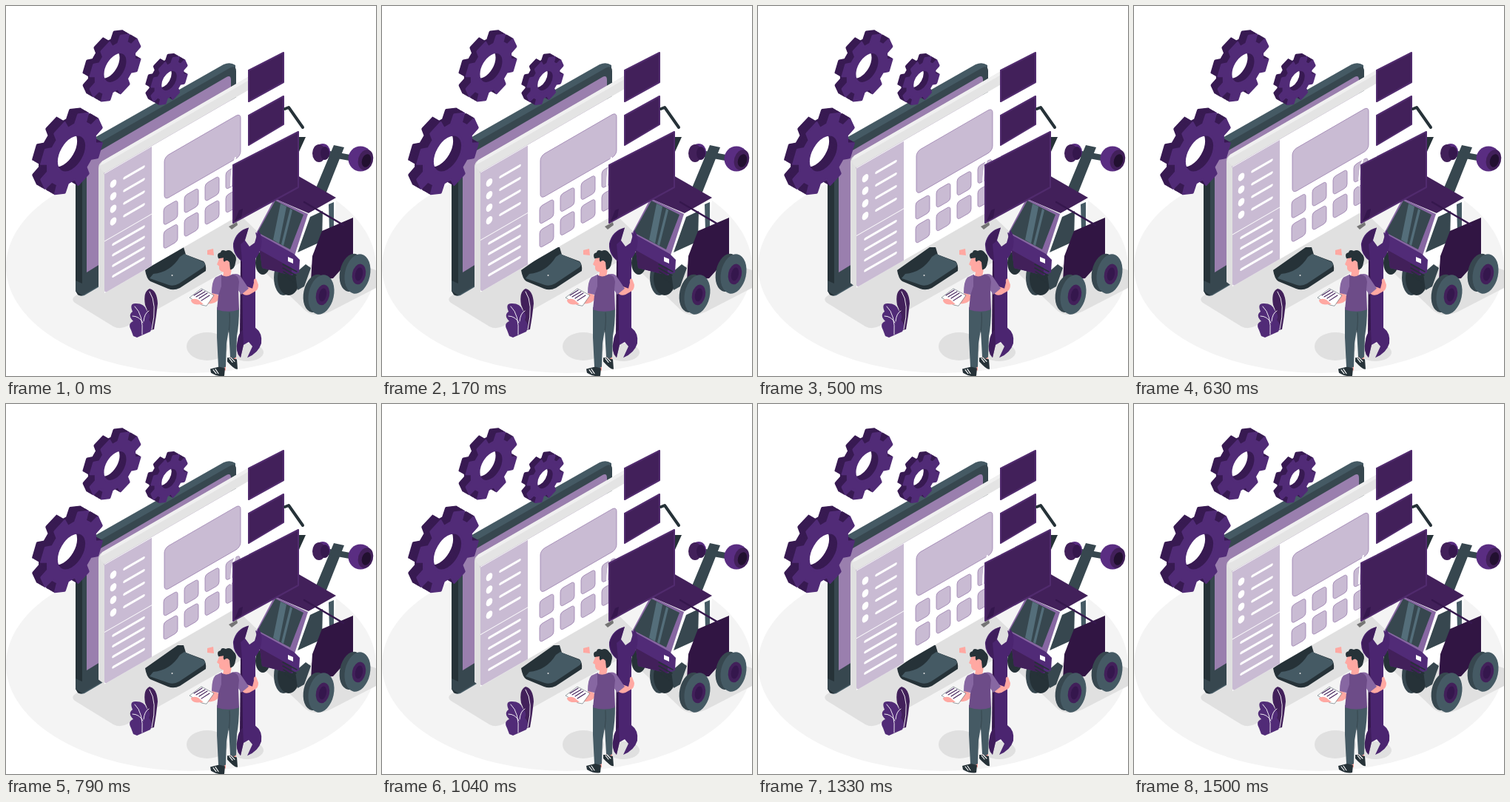
Animation of 500 by 500 pixels, one loop 1540 ms. Source, as an HTML page:

```html
<!DOCTYPE html>
<html lang="en">
<head>
<meta charset="utf-8">
<title>Workshop</title>
<style>
html, body { margin: 0; height: 100%; overflow: hidden; background: #fff; }
svg { display: block; width: 100vw; height: 100vh; }
.line { fill: none; stroke-linecap: round; stroke-linejoin: round; }
</style>
</head>
<body>
<svg viewBox="0 0 500 500">
  <!-- floor and shadows -->
  <ellipse cx="250" cy="352" rx="250" ry="144" fill="#f4f4f4"/>
  <g fill="#e0e0e0">
    <path d="M92 393Q88 397 93 401L145 433Q154 438 165 432L338 335 345 310 318 284 270 270Z"/>
    <path d="M345 355L405 412Q418 422 438 413L500 381V357L465 345Z"/>
    <ellipse cx="272" cy="460" rx="28" ry="19"/>
    <ellipse cx="326" cy="468" rx="22" ry="12"/>
  </g>

  <!-- monitor -->
  <path fill="#455a64" d="M94 202Q94 193 102 188L294 79Q303 75 310 80L311 270 106 391Q101 393 97 390L94 385Z"/>
  <path fill="#263238" d="M94 202Q94 196 98 192L106 197Q103 201 103 206V391Q99 392 97 390L94 385Z"/>
  <path fill="#37474f" d="M103 206Q103 198 110 194L302 84Q311 79 311 88V270L103 391Z"/>
  <path fill="#37474f" d="M94 371L103 375V391L94 385Z"/>
  <path fill="#9a7fae" d="M109 214Q109 206 116 202L298 96Q304 93 304 100V240L109 360Z"/>
  <path fill="#263238" d="M188 357L232 326H240L243 336 267 345Q271 349 270 358L235 381Q227 385 219 382L195 372Q190 369 188 357Z"/>
  <path fill="#455a64" d="M199 362Q222 360 235 339L241 335 267 346Q271 349 267 353L234 375Q227 379 220 377L194 368Z"/>
  <circle cx="224.500" cy="364" r="1" fill="#e0e0e0"/>

  <g id="gears" stroke-width="3" stroke-linejoin="round" fill-rule="evenodd"></g>

  <!-- floating page -->
  <g id="page">
    <path fill="#e0e0e0" d="M125 219Q125 213 130 210L133 228V388L125 382Z"/>
    <g transform="matrix(1 -.577 0 1 133 228)">
      <path fill="#fff" d="M0-2H194V160H0Z"/>
      <path fill="#e4e4e4" d="M-7-14L-3-20H194V-2H0Z"/>
      <path fill="#f0f0f0" d="M-6-16L-3-20H194V-15H0Z"/>
      <path fill="#c9bbd3" d="M0-1H64V160H4Q0 160 0 156Z"/>
      <path stroke="#fff" d="M0 90H64"/>
      <g id="cards" fill="#c9bbd3" stroke="#9a7fae" stroke-width=".7">
        <rect x="81" y="23" width="103" height="58" rx="6"/>
      </g>
      <g id="list" stroke="#fff" stroke-width="3.500" class="line"></g>
    </g>
  </g>

  <!-- hanging slabs and loader -->
  <path fill="#42205a" stroke="#512b6e" stroke-width="2" stroke-linejoin="round" d="M328 87L375 63V103L328 129ZM328 148L375 122V160L328 188Z"/>
  <path class="line" stroke="#263238" stroke-width="4" d="M377 139L382 137 401 164"/>
  <path fill="#263238" d="M394 177H405L395 199Z"/>
  <path fill="#37474f" d="M443 188L457 191 432 254 418 248Z"/>
  <path class="line" stroke="#37474f" stroke-width="8" d="M437 200L470 206"/>
  <g fill="#5a2d82">
    <ellipse cx="428" cy="197" rx="10" ry="11"/>
    <ellipse cx="423" cy="199" rx="9" ry="12" fill="#42205a"/>
    <ellipse cx="431" cy="199" rx="6" ry="9" fill="#35174d"/>
    <ellipse cx="479" cy="206.500" rx="16.500" ry="17"/>
    <ellipse cx="486" cy="208" rx="10" ry="14" transform="rotate(16 486 208)" fill="#42205a"/>
    <ellipse cx="487" cy="209" rx="6" ry="9" transform="rotate(16 487 209)" fill="#221030"/>
  </g>
  <ellipse cx="347" cy="347" rx="10" ry="16" fill="#263238"/>
  <ellipse cx="375" cy="367" rx="13" ry="24" fill="#37474f"/>
  <ellipse cx="382" cy="368" rx="15" ry="23" fill="#263238"/>
  <path fill="#42205a" d="M392 228L446 259 409 280 362 260Z"/>
  <path fill="#fff" d="M409 280L446 260 443 320 425 337 410 352 394 364 390 337Z"/>
  <path fill="#37474f" d="M411 285L428 277 427 318 394 333Z"/>
  <path fill="#455a64" d="M436 268L443 265V304H437Z"/>
  <path fill="#311543" d="M427 304L469 286V338L442 368 412 371 414 338Z"/>
  <path fill="#37474f" d="M391 361L405 349 412 354 403 379 394 384Z"/>
  <path fill="#8767a2" d="M363 260L408 281 390 337 338 307Z"/>
  <path fill="#37474f" d="M364 263L402 282 384 329 340 306Z"/>
  <path fill="#546e7a" d="M371 267L379 271 369 321 361 316ZM384 274L387 276 375 324 372 322Z"/>
  <path fill="#512b77" d="M337 306L389 335 397 343 396 360 386 364 346 354 343 330Z"/>
  <path fill="#42205a" d="M343 330L386 354V364L346 354Z"/>
  <path fill="#fff" d="M381 339L388 342V348L381 345Z"/>
  <path class="line" stroke="#263238" stroke-width="1.500" d="M374 349L393 359M374 354L392 364M375 359L391 369M376 364L390 374"/>
  <path class="line" stroke="#35174d" stroke-width="2.500" d="M403 265L456 296"/>
  <g id="wheels"></g>
  <path fill="#757575" d="M301 298L312 292 313 296 305 302Z"/>
  <path class="line" stroke="#fff" stroke-width="2" d="M310 205Q304 221 304 243"/>
  <path fill="#42205a" stroke="#512b6e" stroke-width="2" stroke-linejoin="round" d="M307 215L395 170V245L307 293Z"/>
  <path fill="#35174d" d="M309 291L315 276 320 274 318 286Z"/>

  <!-- plant -->
  <path fill="#42205a" d="M187 440Q198 425 188 404 185 386 194 382 204 384 205 402 203 421 200 437Z"/>
  <path fill="#512b77" d="M172 446L169 438Q164 429 172 426 164 418 171 413 166 401 176 402 187 402 190 411 197 419 193 424 200 432 195 440L177 448Z"/>
  <path class="line" stroke="#fff" stroke-width=".9" d="M174 406Q186 417 184 444M171 419Q180 419 185 428M193 412Q187 415 186 426M194 386Q205 402 197 437"/>

  <path fill="#ffa8a2" d="M272 330L280 328 281 337 272 336Z"/>

  <!-- worker with wrench -->
  <g id="worker">
    <path fill="#35174d" d="M317 344L322 340V438L316 444Z"/>
    <path fill="#4b2570" d="M319 346Q306 337 307 322 311 305 328 301L323 318 329 326 336 321 341 304Q347 312 345 325 343 336 337 342V434Q347 441 345 455 341 468 326 474L333 459 328 453 321 457 317 474Q309 466 313 451 314 442 320 437Z"/>
    <path fill="#35174d" d="M308 322Q313 306 328 301L322 319 317 323 319 345Q308 337 308 322ZM313 451Q314 442 320 437L321 457 317 474Q309 466 313 451Z" opacity=".55"/>
    <g fill="#ffa8a2">
      <path d="M289 340L285 350 288 352Q287 359 294 360L293 366 303 367 306 349 300 335Z"/>
      <path d="M280 387L289 392Q287 401 277 402L258 403Q251 402 250 397L258 396 275 394Z"/>
      <path d="M316 384L325 379 333 382 335 374Q334 368 338 369L341 377Q341 384 336 386L329 390Q321 393 316 384Z"/>
      <path d="M288 482H297V491H288ZM303 469H311V478H303Z"/>
    </g>
    <path fill="#263238" d="M287 342Q284 335 290 334 291 329 297 332 303 329 307 335 313 340 310 348 309 356 303 357L302 347Q298 342 296 347 293 346 294 341Z"/>
    <circle cx="298" cy="348" r="3" fill="#ffa8a2"/>
    <path fill="#455a64" d="M285 407L315 408Q315 430 312 445L311 473Q307 477 303 473L301 437 298 455 297 486Q292 490 287 486L285 447Z"/>
    <path class="line" stroke="#37474f" d="M302 414Q303 426 301 440"/>
    <path fill="#8767a2" d="M283 367L292 363 291 391 278 388Q278 372 283 367ZM306 363Q315 361 318 367L328 382 318 390 308 376Z"/>
    <path fill="#6d4c88" d="M291 364Q298 368 306 363 314 364 315 373L314 383 315 410Q300 415 285 410L287 391 291 379Z"/>
    <path fill="#263238" d="M288 486L296 488 295 498Q287 500 277 494L276 489ZM303 474L312 476 313 489Q310 491 299 479L299 474Z"/>
    <path class="line" stroke="#fff" stroke-width="1.100" d="M280 490L284 495M283 489L287 495M302 475L306 480M304 474L309 479"/>
    <path fill="#fff" stroke="#37474f" stroke-width=".5" d="M248 394L264 382 281 391 271 405 265 404Z"/>
    <path class="line" stroke="#42205a" stroke-width="1.100" d="M254 391L265 384M257 393L269 386M261 395L272 388M264 398L275 391"/>
    <path fill="#ffa8a2" d="M250 398Q253 394 260 397L267 403H257Q251 402 250 398Z"/>
  </g>
</svg>
<script>
const byId = id => document.getElementById(id);
const add = (id, markup) => byId(id).insertAdjacentHTML('beforeend', markup);

function gearPath(r) {
  const polar = (deg, k) => {
    const a = deg * Math.PI / 180;
    return `${(Math.sin(a) * r * k).toFixed(2)} ${(-Math.cos(a) * r * k).toFixed(2)}`;
  };
  const points = [];
  for (let deg = 22; deg < 382; deg += 45) {
    points.push(polar(deg - 14, .75), polar(deg - 10, .97), polar(deg + 10, .97), polar(deg + 14, .75));
  }
  const h = r * .46;
  return `M${points.join('L')}ZM${-h} 0a${h} ${h} 0 1 0 ${2 * h} 0a${h} ${h} 0 1 0 ${-2 * h} 0Z`;
}

function gear(cx, cy, r, depth) {
  const d = gearPath(r);
  for (let z = depth; z >= 0; z--) {
    const color = z ? '#381a52' : '#512b77';
    add('gears', `<path d="${d}" fill="${color}" stroke="${color}" transform="matrix(.866 -.5 0 1 ${cx - z} ${cy - z * .577})"/>`);
  }
}
gear(88.5, 199.5, 50, 11);
gear(147.5, 83.5, 41, 9);
gear(220.5, 101, 29, 7);

for (let i = 0; i < 4; i++) {
  for (const y of [91, 123]) {
    add('cards', `<rect x="${80 + i * 28}" y="${y}" width="19" height="24" rx="4"/>`);
  }
  const y = 20 + i * 17;
  add('list', `<ellipse cx="12" cy="${y - 1}" rx="4.3" ry="5" fill="#fff" stroke="none"/>
    <path d="M27 ${y}H53M12 ${101 + i * 14.3}H53"/>`);
}

function wheel(x, y) {
  const disc = (dx, rx, ry, color) =>
    `<ellipse cx="${dx}" rx="${rx}" ry="${ry}" fill="${color}"/>`;
  add('wheels', `<g transform="translate(${x} ${y}) rotate(12)">${
    disc(-8, 16, 26, '#37474f')}${disc(0, 17, 27, '#455a64')}${
    disc(2, 9, 14, '#42205a')}${disc(2, 5, 9, '#35174d')}</g>`);
}
wheel(475, 362);
wheel(426, 390);

const LOOP = 1540;
function draw(now) {
  const t = now % LOOP;
  const lift = 4.75 * (1 - Math.cos((t + 30) / LOOP * 2 * Math.PI));
  byId('page').setAttribute('transform', `translate(0 ${-lift})`);

  const u = Math.min(1, Math.max(0, (t - 800) / 240));
  const scale = 1 + .016 * (1 - u * u * (3 - 2 * u));
  byId('worker').setAttribute('transform', `translate(0 390) scale(1 ${scale}) translate(0 -390)`);
  requestAnimationFrame(draw);
}
draw(performance.now());
</script>
</body>
</html>
```
